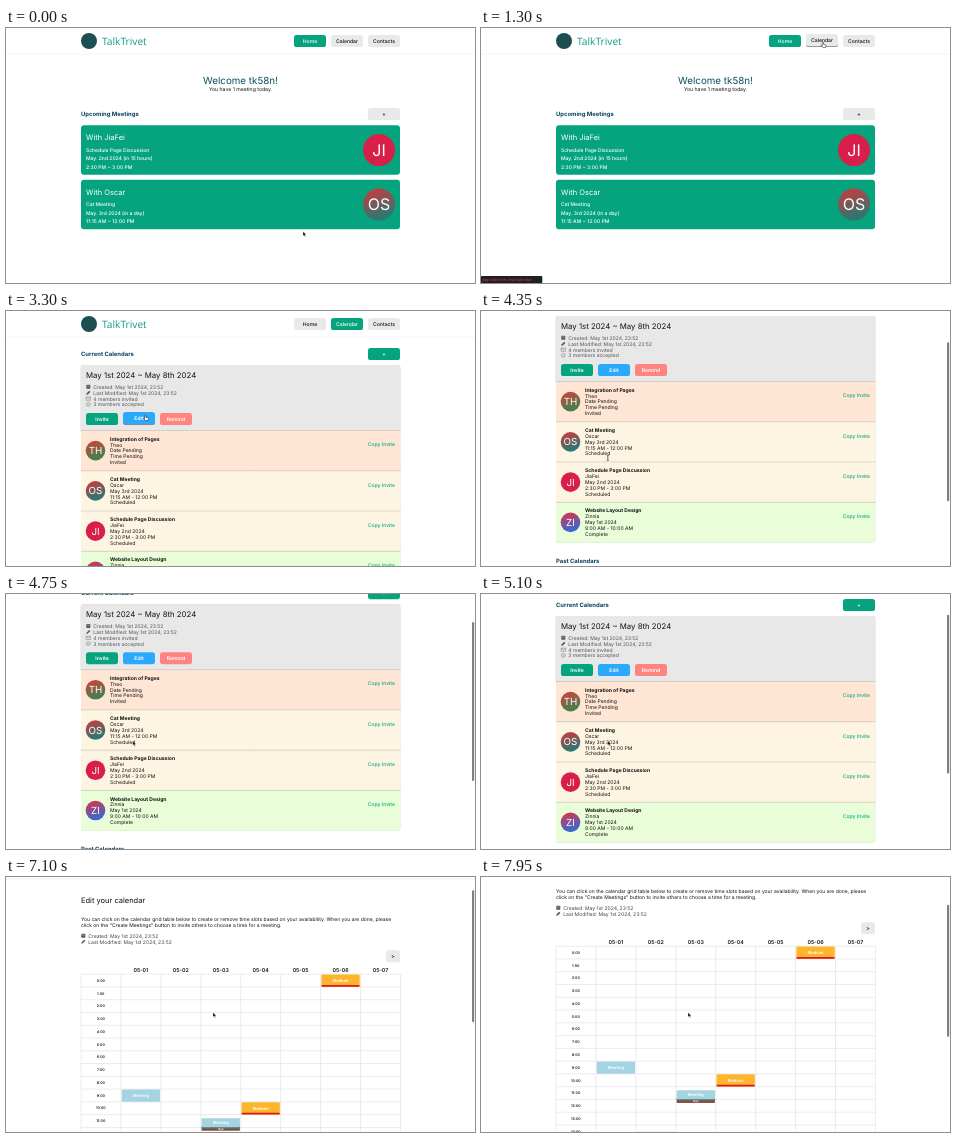
Recreate the animation shown at these times as an HTML page. Size 469x255 px, loop 8000 ms.

```html
<!DOCTYPE html>
<html lang="en">
<head>
<meta charset="utf-8">
<title>Meeting planner</title>
<style>
html, body { margin: 0; width: 100%; height: 100%; overflow: hidden; background: #fff; }
svg { display: block; width: 100%; height: 100%; }
text { font-family: Inter, sans-serif; text-rendering: geometricPrecision; white-space: pre; }
.soft { filter: drop-shadow(0 .8px .7px #0004); }
</style>
</head>
<body>
<svg id="stage" viewBox="0 0 469 255"></svg>
<script>
const LOOP = 8000, VIEW = 255;
const GREEN = '#06a47e', GREY = '#e9e9e9', NAVY = '#063f5c', INK = '#111', DIM = '#555';

const rect = (x, y, w, h, fill, r = 0, attrs = '') =>
  `<rect x="${x}" y="${y}" width="${w}" height="${h}" rx="${r}" fill="${fill}" ${attrs}/>`;
const text = (x, y, size, str, fill = INK, weight = 400, anchor = 'start') =>
  `<text x="${x}" y="${y}" font-size="${size}" fill="${fill}" font-weight="${weight}" text-anchor="${anchor}">${str}</text>`;
const line = (x1, y1, x2, y2, stroke, attrs = '') =>
  `<path d="M${x1} ${y1}L${x2} ${y2}" stroke="${stroke}" stroke-width=".5" ${attrs}/>`;
const button = (x, y, w, label, fill, color = '#fff', weight = 600, id = '') =>
  `<g id="${id}">${rect(x, y, w, 12, fill, 2.6)}${text(x + w / 2, y + 7.9, 5.1, label, color, weight, 'middle')}</g>`;
const avatar = (x, y, r, initials, fill) =>
  `<circle cx="${x}" cy="${y}" r="${r}" fill="${fill}"/>` +
  text(x, y + r * .36, r, initials, '#fff', 400, 'middle');
const gradient = (id, top, bottom) =>
  `<linearGradient id="${id}" x2=".3" y2="1"><stop offset=".1" stop-color="${top}"/><stop offset=".95" stop-color="${bottom}"/></linearGradient>`;

const PEOPLE = {
  JiaFei: ['JI', '#d81f49'],
  Oscar: ['OS', 'url(#redTeal)'],
  Theo: ['TH', 'url(#redGreen)'],
  Zinnia: ['ZI', 'url(#redBlue)'],
};

function header(active, prefix) {
  const tabs = ['Home', 'Calendar', 'Contacts'].map((name, i) => name === active
    ? button(288 + 37 * i, 7, 32, name, GREEN, '#fff', 500, prefix + name)
    : button(288 + 37 * i, 7, 32, name, GREY, INK, 500, prefix + name));
  return '<circle cx="83" cy="13" r="8" fill="#1d4f50"/>' +
    text(96, 17, 10.2, 'TalkTrivet', '#119a84').replace('<text', '<text style="font-family:\'Open Sans\',sans-serif"') +
    tabs.join('') + line(0, 26.2, 469, 26.2, '#e6e8e8');
}

function meetingCard(y, person, lines) {
  return rect(75, y, 319, 49.5, GREEN, 3) +
    text(80, y + 14.9, 7.5, 'With ' + person, '#fff') +
    lines.map((s, i) => text(80, y + 26.3 + 8.5 * i, 5, s, '#fff', 500)).join('') +
    avatar(373, y + 24.8, 16, ...PEOPLE[person]);
}

function homePage() {
  return header('Home', 'home') +
    text(234.5, 56.3, 9.8, 'Welcome tk58n!', '#07505f', 400, 'middle') +
    text(234.5, 63.3, 5.15, 'You have 1 meeting today.', INK, 400, 'middle') +
    text(75, 88, 5.9, 'Upcoming Meetings', NAVY, 700) +
    button(362, 80, 32, '+', GREY, INK) +
    meetingCard(97.3, 'JiaFei', ['Schedule Page Discussion', 'May. 2nd 2024 (in 15 hours)', '2:30 PM ~ 3:00 PM']) +
    meetingCard(151.8, 'Oscar', ['Cat Meeting', 'May. 3rd 2024 (in a day)', '11:15 AM ~ 12:00 PM']);
}

const dayIcon = (x, y) => rect(x, y, 4, 4, DIM, .8) + line(x + .6, y + 1.3, x + 3.4, y + 1.3, '#ddd');
const penIcon = (x, y) => `<path d="M${x} ${y + 4}l.4-1.5 2.5-2.5 1.1 1.1-2.5 2.5z" fill="${DIM}"/>`;
const mailIcon = (x, y) => `<path d="M${x} ${y + .5}h4.4v3.2h-4.4zl2.2 1.8 2.2-1.8" fill="none" stroke="#777" stroke-width=".5"/>`;
const checkIcon = (x, y) => `<path d="M${x} ${y + 2}a2 2 0 1 0 4 0a2 2 0 1 0-4 0m1 0l.8.8 1.4-1.5" fill="none" stroke="#777" stroke-width=".5"/>`;

function inviteRow(i, fill, title, person, date, time, state) {
  const y = 119.5 + 40.25 * i;
  return rect(75, y, 319.5, 40.4, fill) +
    line(75, y, 394.5, y, '#999', 'stroke-dasharray="1 .6"') +
    avatar(89.5, y + 20.1, 9.8, ...PEOPLE[person]) +
    [title, person, date, time, state].map((s, k) =>
      text(104, y + 10.2 + 5.86 * k, 5.05, s, INK, k ? 400 : 700)).join('') +
    text(389, y + 15.8, 5.05, 'Copy Invite', '#08ab7c', 500, 'end');
}

function calendarPage() {
  const info = ['Created: May 1st 2024, 23:52', 'Last Modified: May 1st 2024, 23:52', '4 members invited', '3 members accepted'];
  return header('Calendar', 'cal') +
    text(75, 45, 5.9, 'Current Calendars', NAVY, 700) +
    button(362, 37, 32, '+', GREEN) +
    `<g class="soft"><g clip-path="url(#panel)">` +
    rect(74.5, 54, 320, 66, '#e8e8e8') +
    inviteRow(0, '#fee5d4', 'Integration of Pages', 'Theo', 'Date Pending', 'Time Pending', 'Invited') +
    inviteRow(1, '#fdf4e1', 'Cat Meeting', 'Oscar', 'May 3rd 2024', '11:15 AM - 12:00 PM', 'Scheduled') +
    inviteRow(2, '#fdf4e1', 'Schedule Page Discussion', 'JiaFei', 'May 2nd 2024', '2:30 PM - 3:00 PM', 'Scheduled') +
    inviteRow(3, '#e8fdd8', 'Website Layout Design', 'Zinnia', 'May 1st 2024', '9:00 AM - 10:00 AM', 'Complete') +
    '</g></g>' +
    text(80, 66.6, 7.8, 'May 1st 2024 ~ May 8th 2024') +
    info.map((s, i) => text(87.3, 77.7 + 5.9 * i, 5.05, s, DIM)).join('') +
    dayIcon(80.3, 73.8) + penIcon(80.3, 79.8) + mailIcon(80.1, 85.6) + checkIcon(80.3, 91.4) +
    button(80, 102, 32, 'Invite', GREEN) +
    button(117, 102, 32, 'Edit', '#2ba9fb', '#fff', 600, 'edit') +
    button(154, 102, 32, 'Remind', '#fe8381') +
    text(75, 301, 5.9, 'Past Calendars', NAVY, 700);
}

const COL = 39.93, ROW = 12.77, TOP = 121.2;

function slot(day, hour, length, fill, label, edge) {
  const x = 75 + COL * (day + 1) + .8, y = TOP + ROW * hour + .3, h = ROW * length - .5, w = COL - 1.6;
  return rect(x, y, w, h, fill, 1.2) +
    (edge ? rect(x, y + h - 1.8, w, 1.8, edge, .8) : '') +
    text(x + w / 2, y + h / 2 + 1.5, 4.1, label, '#fff', 600, 'middle');
}

function editPage() {
  let table = '';
  for (let i = 0; i <= 8; i++) {
    const x = 75 + COL * i;
    table += line(x, TOP, x, 440, '#d9d9d9');
    if (i && i < 8) table += text(x + COL / 2, 119.4, 5.3, '05-0' + i, INK, 600, 'middle');
  }
  for (let h = 0; h < 25; h++) {
    const y = TOP + ROW * h;
    table += line(75, y, 394.4, y, '#d9d9d9') + text(94.8, y + 7.6, 3.6, h + ':00', INK, 600, 'middle');
  }
  const late = 75 + COL * 3 + .8, noon = TOP + ROW * 12;
  return header('Calendar', 'plan') +
    text(75, 50.2, 7.5, 'Edit your calendar') +
    text(75, 68.2, 5.03, 'You can click on the calendar grid table below to create or remove time slots based on your availability. When you are done, please') +
    text(75, 74, 5.03, 'click on the "Create Meetings" button to invite others to choose a time for a meeting.') +
    dayIcon(75.3, 80.8) + penIcon(75.3, 86.8) +
    text(82.2, 84.8, 5.05, 'Created: May 1st 2024, 23:52', '#444') +
    text(82.2, 90.8, 5.05, 'Last Modified: May 1st 2024, 23:52', '#444') +
    button(380, 97.3, 14, '&gt;', GREY, INK) + table +
    slot(5, 0, 1, '#fdb62b', 'Medium', '#df1620') +
    slot(0, 9, 1, '#a4d3e1', 'Meeting') +
    slot(3, 10, 1, '#fdb62b', 'Medium', '#df1620') +
    rect(late, noon - 2, COL - 1.6, 5.2, '#52716a', 1) +
    rect(late, noon + 1.9, COL - 1.6, 1.3, '#a23a2c', .6) +
    text(late + 19, noon + 2.2, 2.6, 'High', '#fff', 600, 'middle') +
    slot(2, 11.25, .75, '#a4d3e1', 'Meeting') +
    slot(1, 14.5, .5, '#a4d3e1', '');
}

const $ = id => document.getElementById(id);
$('stage').innerHTML = `
  <defs>
    ${gradient('redTeal', '#c93a3f', '#2f7670')}
    ${gradient('redGreen', '#cc433c', '#467f4d')}
    ${gradient('redBlue', '#d8344e', '#3e68cc')}
    <clipPath id="panel">${rect(74.5, 54, 320, 226.8, '#000', 3)}</clipPath>
  </defs>
  ${rect(0, 0, 469, 255, '#fff')}
  <g id="home">${homePage()}</g>
  <g id="calendar">${calendarPage()}</g>
  <g id="plan">${editPage()}</g>
  <g id="status">${rect(0, 248, 61.3, 7, '#1f2023', .8)}${text(1.5, 253.1, 3.9, 'app.talktrivet.test/calendar', '#e0303c')}</g>
  <rect id="thumb" x="466" width="2.2" rx="1.1" fill="#808080"/>
  <g id="cursor">
    <path id="arrow" d="M0 0v4.6l1.1-1 .8 1.7.8-.4-.8-1.6h1.4z" fill="#000" stroke="#fff" stroke-width=".4"/>
    <path id="hand" d="M-.6-1.6q.6-.7 1.1 0v1.8l2 .5q.6.2.5.9l-.5 2h-2.6l-1.6-2q-.2-.7.5-.6l.6.5z" fill="#fff" stroke="#111" stroke-width=".5"/>
    <path id="beam" d="M-1-2.5q1 0 1 .6v3.8q0 .6 1 .6M1-2.5q-1 0-1 .6M0 1.9q0 .6-1 .6" fill="none" stroke="#111" stroke-width=".6"/>
  </g>`;

const ease = (t, from, to) => {
  const p = Math.min(1, Math.max(0, (t - from) / (to - from)));
  return p * p * (3 - 2 * p);
};
const within = (t, from, to) => t >= from && t < to;
const hover = (t, from, to) => ease(t, from, from + 150) - ease(t, to, to + 150);
const show = (id, on) => $(id).setAttribute('display', on ? 'inline' : 'none');
const shift = (id, x, y) => $(id).setAttribute('transform', `translate(${x} ${y})`);

function lift(id, amount) {
  shift(id, 0, -amount);
  $(id).style.filter = amount > .01 ? `drop-shadow(0 ${amount}px ${.7 * amount}px rgba(0,0,0,.4))` : 'none';
}

// Each move: start, end, destination x and y.
const MOVES = [
  [300, 1050, 342, 16], [1900, 3000, 139.5, 106], [3500, 3800, 126.8, 147],
  [5250, 5700, 137.2, 75], [6300, 6750, 207, 135.5],
];

function render(t) {
  const page = t < 1500 ? 'home' : t < 6000 ? 'calendar' : 'plan';
  ['home', 'calendar', 'plan'].forEach(id => show(id, id === page));

  const scroll = page === 'calendar' ? 49 * ease(t, 3600, 4250) - 17 * ease(t, 4550, 5100)
    : page === 'plan' ? 52 * ease(t, 6650, 7600) : 0;
  shift(page, 0, -scroll);

  const ratio = VIEW / (page === 'plan' ? 492 : 409);
  show('thumb', within(t, 3600, 5700) || t >= 6650);
  $('thumb').setAttribute('y', scroll * ratio + .7);
  $('thumb').setAttribute('height', VIEW * ratio);

  const tabHover = hover(t, 950, 2050);
  lift('homeCalendar', tabHover);
  lift('calCalendar', tabHover);
  lift('edit', hover(t, 2850, 3560) + hover(t, 5570, 6100));
  show('status', within(t, 1000, 2050));

  let x = 297, y = 203.5;
  for (const [from, to, toX, toY] of MOVES) {
    const p = ease(t, from, to);
    x += (toX - x) * p;
    y += (toY - y) * p;
  }
  shift('cursor', x, y);
  const hand = within(t, 950, 2050) || within(t, 2850, 3600) || within(t, 5570, 6000);
  const beam = within(t, 4000, 4700) || within(t, 6000, 6450);
  show('hand', hand);
  show('beam', beam);
  show('arrow', !hand && !beam);
}

const start = performance.now();
function tick() {
  render((performance.now() - start) % LOOP);
  requestAnimationFrame(tick);
}
tick();
</script>
</body>
</html>
```
